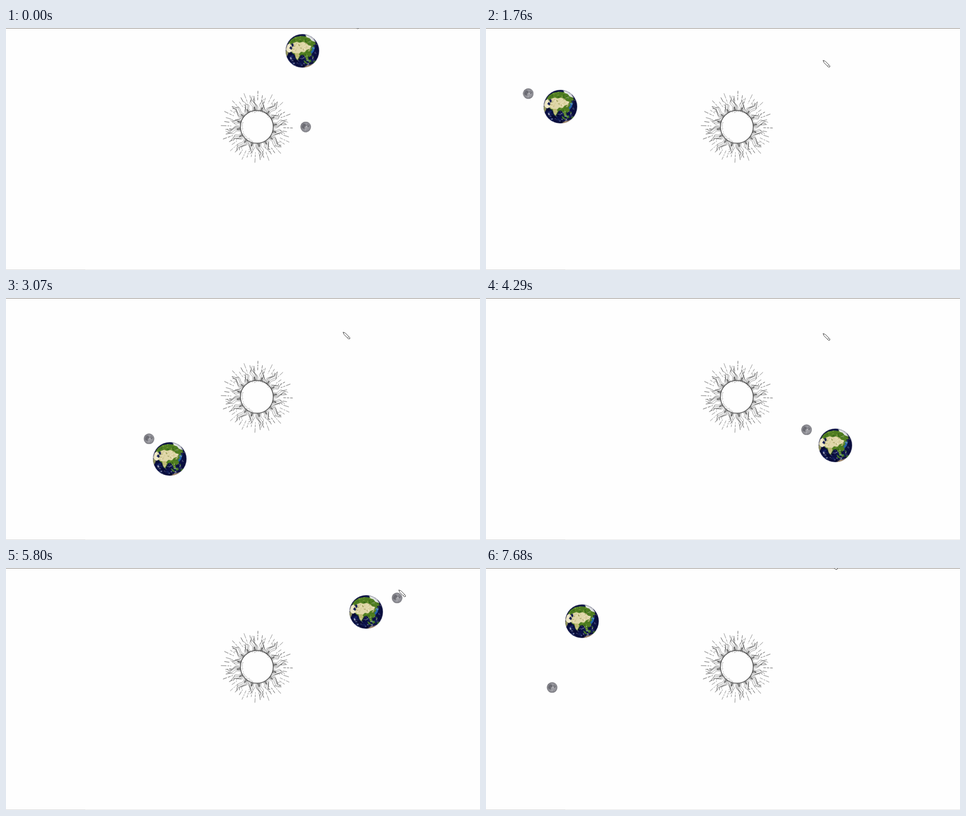
Recreate the animation shown at these times as an HTML page with a canvas. Size 1047 px wide and 535 px high, loop 7700 ms.

```html
<!DOCTYPE html>
<html lang="en">
<head>
<meta charset="utf-8">
<title>Sun, Earth and Moon</title>
<style>
html, body { margin: 0; width: 100%; height: 100%; overflow: hidden; background: #fefefe; }
canvas { display: block; }
</style>
</head>
<body>
<canvas id="stage" width="1047" height="535"></canvas>
<script>
const LOOP = 7700, TAU = Math.PI * 2;
const stage = document.getElementById('stage').getContext('2d');

// Mouse pointer: time, tip x, tip y
const pointerPath = [
  [0, 763, -14], [760, 757, -13], [1200, 752, 40], [1560, 748, 70], [1760, 744, 71],
  [3070, 744, 75], [4290, 744, 78], [4860, 744, 78], [5600, 864, 48], [5800, 867, 48],
  [6150, 871, 46], [6400, 793, 10], [6560, 760, -12], [7700, 760, -12]
];

function seeded(seed) {
  return () => (seed = seed * 16807 % 2147483647) / 2147483647;
}

// Draws once on an off-screen canvas whose origin is its centre
function sprite(radius, draw) {
  const canvas = document.createElement('canvas');
  canvas.width = canvas.height = radius * 2;
  const c = canvas.getContext('2d');
  c.translate(radius, radius);
  draw(c);
  return { canvas, radius };
}

function disc(c, radius) {
  c.beginPath();
  c.arc(0, 0, radius, 0, TAU);
}

function shape(c, color, path) {
  c.fillStyle = color;
  c.fill(new Path2D(path));
}

function speckle(c, random, count, colors, region, size) {
  const [x, y, w, h] = region;
  for (let i = 0; i < count; i++) {
    c.fillStyle = colors[i % colors.length];
    c.beginPath();
    c.ellipse(x + random() * w, y + random() * h, size * (0.5 + random()),
      size * (0.25 + random() * 0.4), random() * 3, 0, TAU);
    c.fill();
  }
}

function polarCurve(c, steps, point) {
  c.beginPath();
  for (let i = 0; i <= steps; i++) {
    const [r, a] = point(i / steps);
    c.lineTo(r * Math.cos(a), r * Math.sin(a));
  }
  c.stroke();
}

const sun = sprite(84, c => {
  const random = seeded(71);
  c.strokeStyle = '#333';
  c.lineCap = 'round';

  // Flames: loose wavy strands, the middle one longest
  for (let i = 0; i < 16; i++) {
    const heading = i / 16 * TAU - 1.69;
    const reach = (i % 2 ? 63 : 71) + random() * 3;
    const turn = i % 4 < 2 ? 1 : -1;
    for (let k = -2; k <= 2; k++) {
      const end = reach - Math.abs(k) * 5 - random() * 4;
      c.lineWidth = k === turn ? 0.9 : 0.6;
      polarCurve(c, 14, u => [
        37 + (end - 37) * u,
        heading + k * 0.078 * (1 - u * 0.5) + turn * 0.075 * Math.sin(u * 6) * (0.5 + u * 0.5)
      ]);
    }
    c.lineWidth = 0.9;
    for (let k = -1; k <= 1; k++) {
      polarCurve(c, 4, u => [37 + u * 7, heading + k * 0.05 * (1 - u * 0.6)]);
    }
  }

  // Broken straight rays
  for (let i = 0; i < 48; i++) {
    const a = i / 48 * TAU + 0.04 + (random() - 0.5) * 0.03;
    const end = i % 3 ? 65 + random() * 9 : 79;
    c.lineWidth = 0.6 + random() * 0.4;
    c.setLineDash([4 + random() * 8, 3, 2 + random() * 4, 3]);
    polarCurve(c, 1, u => [end - u * (i % 3 ? 13 : 22), a]);
  }
  c.setLineDash([]);

  disc(c, 36.3);
  c.fillStyle = '#fefefe';
  c.fill();
  c.lineWidth = 1.4;
  c.stroke();

  // Sparse hatching inside the rim
  c.lineWidth = 0.5;
  for (let i = 0; i < 26; i++) {
    const a = i < 16 ? 1.9 + i * 0.1 : 4.4 + (i - 16) * 0.13;
    const r = 32 + random() * 3;
    const x = r * Math.cos(a), y = r * Math.sin(a);
    c.beginPath();
    c.moveTo(x, y);
    c.lineTo(x + 1 + random() * 2.5, y - 0.5);
    c.stroke();
  }
});

const earth = sprite(38, c => {
  const random = seeded(29);
  disc(c, 37);
  c.clip();
  c.fillStyle = '#0b1046';
  c.fillRect(-38, -38, 76, 76);
  speckle(c, random, 40, ['#152262', '#070a30'], [-36, -10, 72, 46], 4);
  shape(c, '#2463a8', 'M20-13L28-8 25 1 20 7 17 0Z');

  const land = new Path2D('M-31-17L-25-25-15-31-3-33 9-33 21-29 28-20 30-14 24-13 26-7 21-9 22-2 ' +
    '18 2 21 8 15 14 12 11 14 19 9 23 7 15 2 9-3 9-7 15-10 21-14 18-17 9-22 5-26 0-22-6-26-11Z');
  c.save();
  c.clip(land);
  c.fillStyle = '#4f7d20';
  c.fillRect(-38, -38, 76, 76);
  speckle(c, random, 80, ['#2c5a17', '#6d9a30', '#417020', '#83a045'], [-30, -34, 64, 57], 2.2);
  shape(c, '#e0d7a9', 'M-27-13L-21-17-13-20-6-18 1-20 9-17 14-12 20-11 17-5 9-2 5 3-3 2-8 7-14 5-20 5-25 0Z');
  speckle(c, random, 45, ['#f0e8c6', '#c5ba82', '#d2c791', '#a0a05c'], [-23, -17, 40, 20], 1.8);
  shape(c, '#bdb873', 'M-17 5L-9 5-6 10-11 20-15 15Z');
  c.restore();

  shape(c, '#f0e9c8', 'M-37-3L-33-14-27-17-26-10-29-6-25-3-23 1-29 4-34 2Z');
  shape(c, '#a5a766', 'M-37 0L-33 1-31 5-34 12-37 10Z');
  shape(c, '#10194f', 'M-25-15L-21-17-19-12-22-8Z M-1-37L9-36 6-32-3-33Z');
  shape(c, '#f5f7f8', 'M6-36L15-34 24-28 29-20 24-21 20-23 16-28 10-30Z');
  shape(c, '#4b8427', 'M3 20L9 25 12 28 9 29 4 25Z M12 21L18 19 20 24 15 26Z M23 24L30 21 31 24 25 27Z M22 10L25 13 23 17Z');
  shape(c, '#d2aa72', 'M3 37L9 33 17 31 23 28 18 35 8 38Z');

  speckle(c, random, 60, ['#ffffffa0', '#c8d4e860', '#ffffff40'], [-29, 10, 60, 24], 1.7);
  speckle(c, random, 16, ['#ffffff75', '#dce5f055'], [14, -22, 19, 32], 1.5);

  const shade = c.createRadialGradient(-3, -4, 30, 0, 0, 37);
  shade.addColorStop(0, '#00000000');
  shade.addColorStop(1, '#00001840');
  c.fillStyle = shade;
  c.fillRect(-38, -38, 76, 76);
});

const moon = sprite(12, c => {
  const random = seeded(8);
  disc(c, 11.5);
  c.clip();
  const tone = c.createRadialGradient(1, 0, 3, 0, 0, 11.5);
  tone.addColorStop(0, '#a0a0a6');
  tone.addColorStop(0.8, '#8e8e95');
  tone.addColorStop(1, '#606066');
  c.fillStyle = tone;
  c.fillRect(-12, -12, 24, 24);
  shape(c, '#5f5f67cc', 'M-8-3L-5-7 0-6 1-2-3 0-2 4-6 4-9 1Z M2-5L6-6 8-2 5 1 2-1Z');
  speckle(c, random, 26, ['#5d5d6380', '#c4c4c880'], [-9, -9, 18, 18], 1.3);
  shape(c, '#d0d0d3', 'M1-2h2v2h-2Z M-1 6h2v1h-2Z');
});

function place(item, x, y) {
  stage.drawImage(item.canvas, x - item.radius, y - item.radius);
}

function pointerAt(time) {
  const i = pointerPath.findIndex(key => key[0] > time);
  const [t0, x0, y0] = pointerPath[i - 1], [t1, x1, y1] = pointerPath[i];
  const u = (time - t0) / (t1 - t0);
  return [x0 + (x1 - x0) * u, y0 + (y1 - y0) * u];
}

function drawPencil(x, y) {
  stage.save();
  stage.translate(Math.round(x) + 0.5, Math.round(y) + 0.5);
  stage.fillStyle = '#fff';
  stage.strokeStyle = '#222';
  stage.lineWidth = 1;
  stage.lineJoin = 'round';
  const body = new Path2D('M0 0L2 5 12 15 15 14.5 15 12 5 2Z M10 13L13 10');
  stage.fill(body);
  stage.stroke(body);
  stage.restore();
}

function render(time) {
  const t = time / 1000;
  const orbit = t + 1.189, spin = 5 * t + 1.5;
  const x = 520 + 362.3 * Math.cos(orbit);
  const y = 205.6 - 167 * Math.sin(orbit);

  stage.fillStyle = '#fefefe';
  stage.fillRect(0, 0, 1047, 535);
  place(sun, 554, 218.5);
  place(earth, x, y);
  place(moon, x + 111.3 * Math.cos(spin), y + 57 + 111.3 * Math.sin(spin));

  stage.fillStyle = '#77706a';
  stage.fillRect(0, 0, 1047, 1);
  stage.fillStyle = '#e2e2e2';
  stage.fillRect(0, 534, 1047, 1);
  stage.fillStyle = '#d2d2d2';
  stage.fillRect(0, 534, 175, 1);
  drawPencil(...pointerAt(time));
}

const start = performance.now();
function tick() {
  render((performance.now() - start) % LOOP);
  requestAnimationFrame(tick);
}
tick();
</script>
</body>
</html>
```
